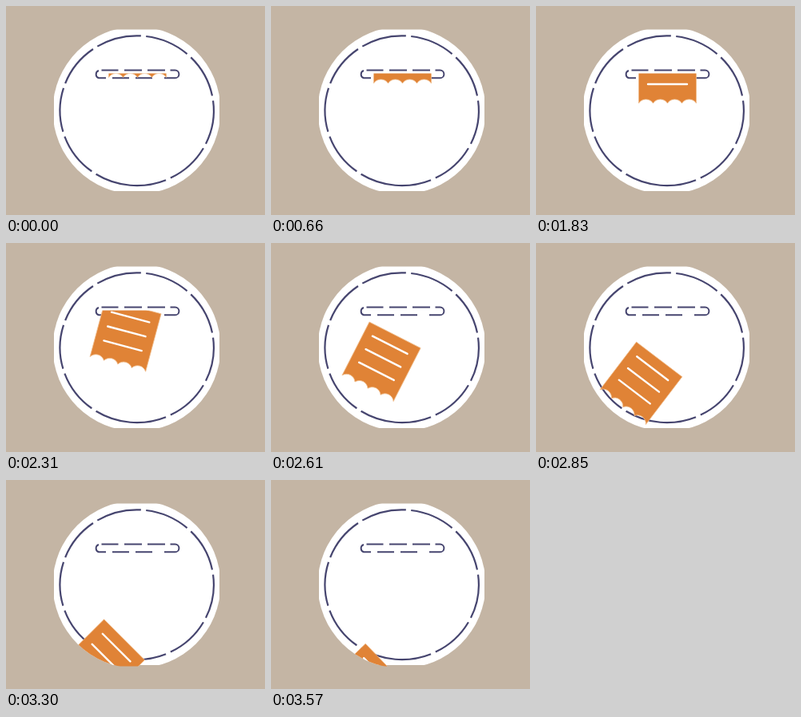
An HTML page for the animation above (3.6 s loop, 324 by 262 pixels).

```html
<!DOCTYPE html>
<html lang="en">
<head>
<meta charset="utf-8">
<title>Receipt</title>
<style>
  html, body { margin: 0; width: 100%; height: 100%; overflow: hidden; background: #c4b5a4; }
  svg { display: block; width: 100vw; height: 100vh; }
</style>
</head>
<body>
<svg viewBox="0 0 324 262">
  <defs>
    <clipPath id="disc"><circle cx="163.5" cy="131" r="105"/></clipPath>
    <clipPath id="below" clip-path="url(#disc)"><rect x="60" y="84.5" width="207" height="149"/></clipPath>
  </defs>
  <rect x="60" y="29.5" width="207" height="202.5" fill="#fff" clip-path="url(#disc)"/>
  <g fill="none" stroke="#46456f" stroke-width="2.2">
    <path id="ring"/>
    <path stroke-width="2" d="M119.5 80.5H140.5M148 80.5H170M177 80.5H199
      M205.5 80.5H211.5a4.9 4.9 0 0 1 0 9.8H198
      M183 90.3H162M154 90.3H133M125 90.3H116a4.9 4.9 0 0 1 0 -9.3"/>
  </g>
  <g clip-path="url(#below)">
    <g id="paper">
      <path id="sheet" fill="#e08336" stroke="#f0bd8c" stroke-width=".8"/>
      <path d="M11.5 14H60.5M11.5 32.5H60.5M11.5 51H60.5" stroke="#fff" stroke-width="2.4" stroke-linecap="round"/>
    </g>
  </g>
</svg>
<script>
const LOOP = 3600, STEP = 30;
const byId = id => document.getElementById(id);

// Ring: eight equal dashes, the last one runs long to close the loop
function ringPath() {
  const first = 124, pitch = 37.74, half = 1.9;
  const at = deg => {
    const a = deg * Math.PI / 180;
    return `${163.7 + 96.2 * Math.cos(a)} ${131.2 + 93.9 * Math.sin(a)}`;
  };
  let d = "";
  for (let i = 0; i < 9; i++) {
    const from = first + i * pitch + half;
    const to = (i < 8 ? first + (i + 1) * pitch : first + 360) - half;
    d += `M${at(from)}A96.2 93.9 0 0 1 ${at(to)}`;
  }
  return d;
}

byId("ring").setAttribute("d", ringPath());
byId("sheet").setAttribute("d", "M0 0H72V75" + "a10.6 10.6 0 0 0 -18 0".repeat(4) + "Z");

// time, centre x, centre y, rotation
const keys = [
  [180, 164.5, 51.5, 0],
  [720, 164.5, 60, 0],
  [1230, 164.5, 70, 0],
  [1830, 164.5, 84, 0],
  [2310, 149.7, 115.2, 15],
  [2610, 138.3, 148.3, 27],
  [3090, 126.2, 202.6, 44],
  [3570, 116.6, 256.8, 46]
];

const slope = (i, k) => (keys[i + 1][k] - keys[i][k]) / (keys[i + 1][0] - keys[i][0]);

function tangent(i, k) {
  if (i === 0) return slope(0, k);
  if (i === keys.length - 1) return slope(i - 1, k);
  const a = slope(i - 1, k), b = slope(i, k);
  return a * b > 0 ? 2 * a * b / (a + b) : 0;
}

// Monotone cubic through the keys
function value(t, k) {
  const last = keys.length - 1;
  if (t <= keys[0][0]) return keys[0][k];
  if (t >= keys[last][0]) return keys[last][k];
  let i = 0;
  while (t > keys[i + 1][0]) i++;
  const h = keys[i + 1][0] - keys[i][0];
  const u = (t - keys[i][0]) / h, v = 1 - u;
  return keys[i][k] * (1 + 2 * u) * v * v + keys[i + 1][k] * u * u * (3 - 2 * u)
    + h * u * v * (tangent(i, k) * v - tangent(i + 1, k) * u);
}

function draw(ms) {
  const t = Math.floor(ms % LOOP / STEP) * STEP;
  const [x, y, r] = [1, 2, 3].map(k => value(t, k));
  byId("paper").setAttribute("transform", `translate(${x} ${y}) rotate(${r}) translate(-36 -37)`);
}

const start = performance.now();
function tick() {
  draw(performance.now() - start);
  requestAnimationFrame(tick);
}
tick();
</script>
</body>
</html>
```
